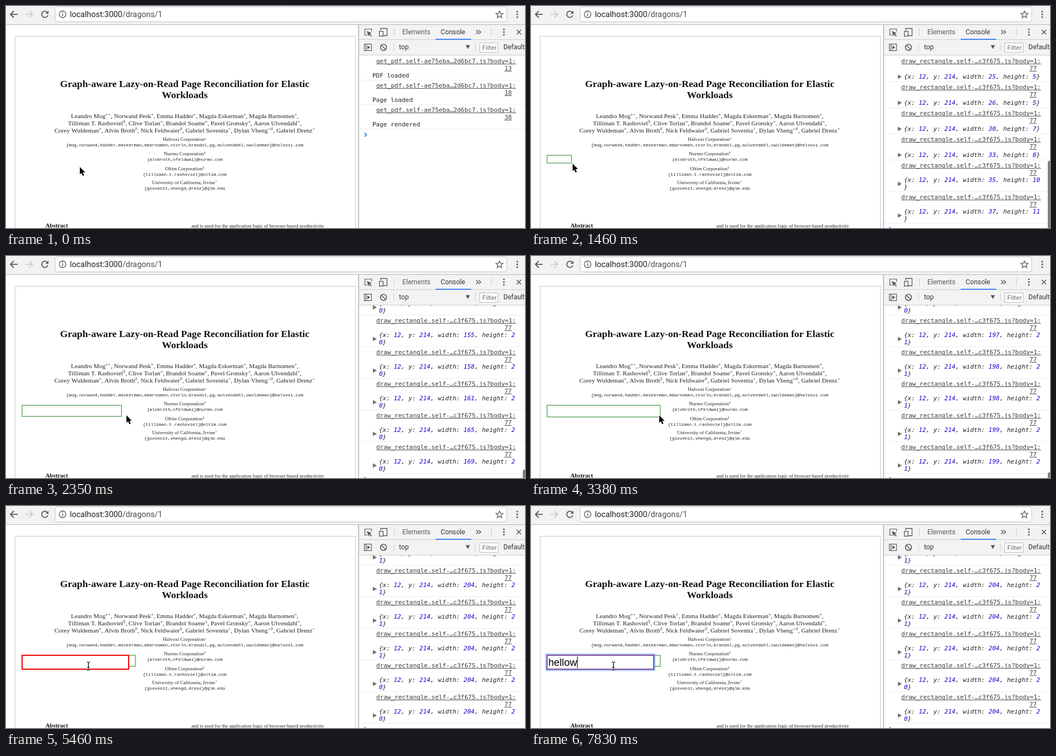
An HTML page with a canvas for the animation above (8000 ms loop, 935 by 400 pixels).

```html
<!DOCTYPE html>
<html lang="en">
<head>
<meta charset="utf-8">
<title>PDF annotation demo</title>
<style>
html, body { margin: 0; width: 100%; height: 100%; overflow: hidden; background: #fff; }
canvas { display: block; }
</style>
</head>
<body>
<canvas id="stage" width="935" height="400"></canvas>
<script>
const ctx = document.getElementById('stage').getContext('2d');
const LOOP = 8000;
const UI = 'Roboto, sans-serif';
const SERIF = '"Liberation Serif", serif';
const COURIER = '"Liberation Mono", monospace';
const MONO = '11px "DejaVu Sans Mono", monospace';

// ---------- helpers ----------
function text(str, x, y, font, color = '#222', align = 'left') {
  ctx.font = font;
  ctx.fillStyle = color;
  ctx.textAlign = align;
  ctx.fillText(str, x, y);
}

function fill(x, y, w, h, color) {
  ctx.fillStyle = color;
  ctx.fillRect(x, y, w, h);
}

function frame(x, y, w, h, color, line = 1) {
  ctx.strokeStyle = color;
  ctx.lineWidth = line;
  ctx.strokeRect(x + line / 2, y + line / 2, w - line, h - line);
}

function path(points, color, line = 1.5) {
  ctx.beginPath();
  points.forEach(([x, y]) => ctx.lineTo(x, y));
  ctx.strokeStyle = color;
  ctx.lineWidth = line;
  ctx.stroke();
}

function poly(points, color) {
  ctx.beginPath();
  points.forEach(([x, y]) => ctx.lineTo(x, y));
  ctx.closePath();
  ctx.fillStyle = color;
  ctx.fill();
}

function arc(x, y, r, color, line = 1.5, from = 0, to = Math.PI * 2) {
  ctx.beginPath();
  ctx.arc(x, y, r, from, to);
  ctx.strokeStyle = color;
  ctx.lineWidth = line;
  ctx.stroke();
}

function dots(x, y, gap, color) {
  for (let i = -1; i <= 1; i++) {
    ctx.beginPath();
    ctx.arc(x, y + i * gap, 1.6, 0, Math.PI * 2);
    ctx.fillStyle = color;
    ctx.fill();
  }
}

// Number of changes made so far, for `count` evenly spaced changes.
function steps(t, first, last, count) {
  if (t < first) return 0;
  return Math.min(count, 1 + Math.floor((t - first + 1) * (count - 1) / (last - first)));
}

// ---------- console log ----------
const pageLogs = [['PDF loaded', 13], ['Page loaded', 18], ['Page rendered', 38]]
  .map(([msg, line]) => ({ msg, line, height: 44, link: 'get_pdf.self-ae75eba…2d6bc7.js?body=1:' }));

const drags = [];
function logDrag(w, h) {
  w = Math.round(w);
  const msg = `{x: 12, y: 214, width: ${w}, height: ${h}}`;
  drags.push({ w, h, msg, line: 77, object: true, height: msg.length > 37 ? 57 : 47,
               link: 'draw_rectangle.self-…c3f675.js?body=1:' });
}
[1, 3, 6, 9, 13, 16, 19, 22].forEach(w => logDrag(w, Math.round(w / 5)));
[[25, 5], [26, 5], [30, 7], [33, 8], [35, 10], [37, 11]].forEach(([w, h]) => logDrag(w, h));
for (let i = 1; i <= 49; i++) logDrag(37 + 115 * i / 49, Math.min(20, 11 + Math.ceil(i / 3)));
[155, 158, 161, 165, 169].forEach(w => logDrag(w, 20));
for (let i = 1; i <= 55; i++) logDrag(204 - 35 * (1 - i / 55) ** 2, i > 30 ? 21 : 20);
logDrag(204, 20);
logDrag(204, 20);

function dragCount(t) {
  const quick = steps(t, 1310, 2350, 8);
  const slow = steps(t, 2490, 3530, 8) + steps(t, 3670, 3970, 3);
  if (!quick) return 0;
  return (quick === 1 ? 5 : 14 + 9 * (quick - 2)) + 5 * slow + (t >= 4420 ? 2 : 0);
}

// ---------- browser chrome ----------
function drawBrowser() {
  fill(0, 0, 935, 33, '#f2f2f2');
  fill(0, 33, 935, 1, '#b8b8b8');
  const arrow = (x, dir, color) => {
    path([[x, 15], [x + 13 * dir, 15]], color, 1.8);
    path([[x + 6 * dir, 9], [x, 15], [x + 6 * dir, 21]], color, 1.8);
  };
  arrow(8, 1, '#5a5a5a');
  arrow(48, -1, '#cdcdcd');
  arc(70, 15, 5.6, '#5a5a5a', 1.8, 0.3, 5.5);
  poly([[76.5, 8.5], [76.5, 14], [71, 14]], '#5a5a5a');

  ctx.beginPath();
  ctx.roundRect(88.5, 1.5, 813.5, 27, 3);
  ctx.fillStyle = '#fff';
  ctx.fill();
  ctx.strokeStyle = '#c4c4c4';
  ctx.lineWidth = 1;
  ctx.stroke();

  arc(102, 15, 6, '#5a5a5a', 1.3);
  fill(101.3, 14, 1.5, 4.5, '#5a5a5a');
  fill(101.3, 11.3, 1.5, 1.5, '#5a5a5a');
  const font = '14.4px ' + UI;
  text('localhost:3000', 115, 20.3, font, '#222');
  text('/dragons/1', 115 + ctx.measureText('localhost:3000').width, 20.3, font, '#4c4c4c');

  const star = [];
  for (let i = 0; i <= 10; i++) {
    const a = i * Math.PI / 5 - Math.PI / 2, r = i % 2 ? 3 : 6.8;
    star.push([889 + r * Math.cos(a), 15.5 + r * Math.sin(a)]);
  }
  path(star, '#5a5a5a', 1.3);
  dots(921, 15, 5, '#5a5a5a');
}

// ---------- document ----------
// Centred line whose footnote marks are set small and raised.
function markedLine(str, y, size) {
  const parts = str.split(/([*+#§])/).filter(Boolean).map(s => {
    const mark = /[*+#§]/.test(s);
    const font = `${mark ? size * 0.78 : size}px ${SERIF}`;
    ctx.font = font;
    return { s, mark, font, width: ctx.measureText(s).width };
  });
  let x = 322 - parts.reduce((sum, p) => sum + p.width, 0) / 2;
  for (const p of parts) {
    const lift = !p.mark ? 0 : p.s === '*' ? size * 0.15 : size * 0.36;
    text(p.s, x, y - lift, p.font, p.mark ? '#555' : '#222');
    x += p.width;
  }
}

function drawDocument() {
  frame(16, 54, 614, 400, '#cacaca');
  const title = 'bold 17.7px ' + SERIF;
  text('Graph-aware Lazy-on-Read Page Reconciliation for Elastic', 322, 146, title, '#111', 'center');
  text('Workloads', 322, 166, title, '#111', 'center');

  markedLine('Leandro Mog*+, Norwand Pesk*, Emma Hadder*, Magda Eskerman*, Magda Barnomen*,', 202, 11.4);
  markedLine('Tilliman T. Rashoviel§, Clive Torlan*, Brandol Soame*, Pavel Gronsky*, Aaron Ulvendahl*,', 215, 11.4);
  markedLine('Corey Wuldeman*, Alvin Broth#, Nick Feldwaier#, Gabriel Sovenita+, Dylan Vheng+#, Gabriel Drenz+', 228, 11.4);

  [
    ['Halvoxi Corporation*', 243,
     '{mog,norwand,hadder,meskerman,mbarnomen,ctorln,brandol,pg,aulvendahl,cwuldeman}@halvoxi.com'],
    ['Nurmo Corporation#', 269, '{alvbroth,nfeldwai}@nurmo.com'],
    ['Oltim Corporation§', 296, '{tilliman.t.rashoviel}@oltim.com'],
    ['University of California, Irvine+', 321, '{gsovenit,vhengd,drenz}@qlm.edu']
  ].forEach(([place, y, mail]) => {
    markedLine(place, y, 9.1);
    text(mail, 322, y + 10, '7.84px ' + COURIER, '#222', 'center');
  });

  text('Abstract', 71, 399, 'bold 10.9px ' + SERIF, '#111');
  text('and is used for the application logic of browser-based productivity', 334, 399, '9px ' + SERIF);
}

// ---------- developer tools ----------
function drawTools() {
  const ink = '#5a5a5a', rule = '#cccccc', label = '12.2px ' + UI;
  fill(635, 34, 300, 366, '#fff');
  fill(635, 34, 300, 54, '#f3f3f3');
  fill(635, 60, 300, 1, rule);
  fill(635, 88, 300, 1, rule);
  fill(634.5, 34, 1.5, 366, '#b0b0b0');

  path([[651, 52.5], [646.5, 52.5], [646.5, 41.5], [658.5, 41.5], [658.5, 46]], ink, 1.2);
  poly([[650, 45], [659, 49], [655.5, 50.2], [659, 53.7], [657.7, 55], [654.2, 51.5], [653, 55]], ink);
  path([[675, 44], [675, 40.5], [686.5, 40.5], [686.5, 53.5], [680, 53.5]], ink, 1.3);
  frame(672, 45, 8, 10, ink, 1.3);
  fill(699, 40, 1, 14, rule);
  text('Elements', 714, 51, label, '#5a5a5a');
  text('Console', 783, 51, label, '#333');
  fill(774, 59, 64, 2, '#4285f4');
  for (const x of [847, 851.5]) path([[x, 43.5], [x + 3.7, 47], [x, 50.5]], ink, 1.5);
  fill(874, 40, 1, 14, rule);
  dots(897, 47, 5, ink);
  path([[920, 43], [928, 51]], ink, 1.6);
  path([[928, 43], [920, 51]], ink, 1.6);

  frame(645, 68, 14, 13, ink, 1.2);
  fill(648, 68, 1.2, 13, ink);
  poly([[651, 71], [651, 78], [656, 74.5]], ink);
  arc(680, 74.5, 5.5, ink, 1.6);
  path([[676, 70.5], [684, 78.5]], ink, 1.6);
  fill(698, 67, 1, 14, rule);
  text('top', 708, 78, label, '#333');
  poly([[828, 70.5], [836, 70.5], [832, 77.5]], ink);
  fill(845, 67, 1, 14, rule);
  fill(853, 66, 34, 18, '#fff');
  frame(853, 66, 34, 18, '#bcbcbc');
  text('Filter', 858, 79, '11.6px ' + UI, '#6c6c6c');
  text('Default', 896, 78, '12px ' + UI, '#333');
}

function underlined(str, x, y) {
  text(str, x, y, MONO, '#3c3c3c');
  fill(x, y + 1, ctx.measureText(str).width, 1, '#505050');
}

function objectLine(str, x, y) {
  for (const part of str.split(/(\d+)/)) {
    text(part, x, y, 'italic ' + MONO, /\d/.test(part) ? '#1c00cf' : '#222');
    x += ctx.measureText(part).width;
  }
}

function drawEntry(entry, top) {
  underlined(entry.link, 667, top + 14);
  underlined(String(entry.line), 898, top + 27);
  if (entry.object) {
    const wrapped = entry.height === 57;
    const y = top + (wrapped ? 40 : 42);
    objectLine(entry.msg.slice(0, 37), 672, y);
    objectLine(entry.msg.slice(37), 672, y + 13);
    const mid = top + (wrapped ? 43.5 : 38.5);
    poly([[661, mid - 4], [661, mid + 4], [668, mid]], '#727272');
  } else {
    text(entry.msg, 660, top + 40, MONO, '#262626');
  }
  fill(636, top + entry.height, 299, 1, '#eeeeee');
}

function drawConsole(t) {
  const entries = pageLogs.concat(drags.slice(0, dragCount(t)));
  const total = entries.reduce((sum, e) => sum + e.height, 0);
  const bottom = Math.min(89 + total, 391);

  ctx.save();
  ctx.beginPath();
  ctx.rect(636, 89, 299, 311);
  ctx.clip();
  for (let i = entries.length - 1, y = bottom; i >= 0 && y > 89; i--) {
    y -= entries[i].height;
    drawEntry(entries[i], y);
  }
  path([[646, bottom + 7.5], [649.5, bottom + 11], [646, bottom + 14.5]], '#3b82f0', 1.8);

  const alpha = 0.5 * (1 - steps(t, 5020, 5460, 4) / 4);
  if (entries.length > 3 && alpha > 0) {
    const thumb = Math.min(390, 412 - 324 * 324 / (total - 20));
    ctx.beginPath();
    ctx.roundRect(931, thumb, 6, 412 - thumb, 3);
    ctx.fillStyle = `rgba(0,0,0,${alpha})`;
    ctx.fill();
  }
  ctx.restore();
}

// ---------- drawn rectangle, input and pointer ----------
function dragState(t) {
  const last = drags[dragCount(t) - 1];
  if (!last) return null;
  const w = Math.min(204, Math.round(last.w + Math.min(10, 3 + last.w * 0.11)));
  const h = last.h >= 20 ? last.h : Math.min(20, last.h + 3);
  const x = Math.min(231, Math.round(28 + w + Math.min(10, last.w * 0.08)));
  return { w, h, x, y: Math.min(287, 270 + h) };
}

const typing = [[6500, 'h'], [7100, 'he'], [7390, 'hel'], [7537, 'hell'], [7683, 'hello'], [7830, 'hellow']];

function drawInput(t) {
  fill(28, 268, 194, 27, '#fff');
  frame(28, 268, 194, 27, '#f00000', 2);
  if (t < 5760) return;
  const ring = ['rgba(90,150,240,.18)', 'rgba(90,150,240,.4)', 'rgba(90,140,230,.65)', '#7a58b0', '#a24c8a'];
  ring.forEach((color, i) => {
    const o = i - 3;
    frame(28 + o, 268 + o, 194 - 2 * o, 27 - 2 * o, color);
  });
  fill(220, 270, 1, 23, '#dc2c50');

  const value = typing.reduce((s, [at, v]) => t >= at ? v : s, '');
  text(value, 31.2, 288, '18.3px "Liberation Sans", sans-serif', '#000');
  const caretOn = t < 6200 || t >= 6500;
  if (caretOn) fill(Math.floor(31.2 + ctx.measureText(value).width), 271, 1, 21, '#000');
}

function drawArrow(x, y) {
  const shape = [[0, 0], [0, 13.5], [3, 10.7], [5.2, 16], [7.6, 15], [5.4, 9.8], [9.6, 9.8]]
    .map(([dx, dy]) => [x + dx, y + dy]);
  path(shape.concat([shape[0], shape[1]]), '#fff', 2);
  poly(shape, '#000');
}

function drawBeam(x) {
  const draw = (color, line) => {
    path([[x - 3, 281], [x - 1, 281.3], [x, 283], [x, 294], [x - 1, 295.7], [x - 3, 296]], color, line);
    path([[x + 3, 281], [x + 1, 281.3], [x, 283], [x, 294], [x + 1, 295.7], [x + 3, 296]], color, line);
    path([[x - 2, 290.5], [x + 2, 290.5]], color, line);
  };
  draw('#fff', 2.6);
  draw('#111', 1.2);
}

const approach = [[133, 290], [128, 289], [112, 284], [88, 277], [64, 270], [44, 265], [31, 264], [26, 267], [28, 269]];

function drawPointer(t, drag) {
  const leave = steps(t, 5020, 5460, 4);
  if (leave > 1) drawBeam([195.5, 165.5, 148.5][leave - 2]);
  else if (leave === 1) drawArrow(222, 286);
  else if (drag) drawArrow(drag.x, drag.y);
  else drawArrow(...approach[steps(t, 140, 1160, 8)]);
}

function draw(t) {
  fill(0, 0, 935, 400, '#fff');
  drawBrowser();
  drawDocument();
  drawTools();
  drawConsole(t);
  const drag = dragState(t);
  if (drag) frame(28, 268, drag.w + 2, drag.h + 2, '#8fbf8f', 2);
  if (t >= 4420) drawInput(t);
  drawPointer(t, drag);
}

const start = performance.now();
function tick() {
  draw((performance.now() - start) % LOOP);
  requestAnimationFrame(tick);
}
tick();
</script>
</body>
</html>
```
